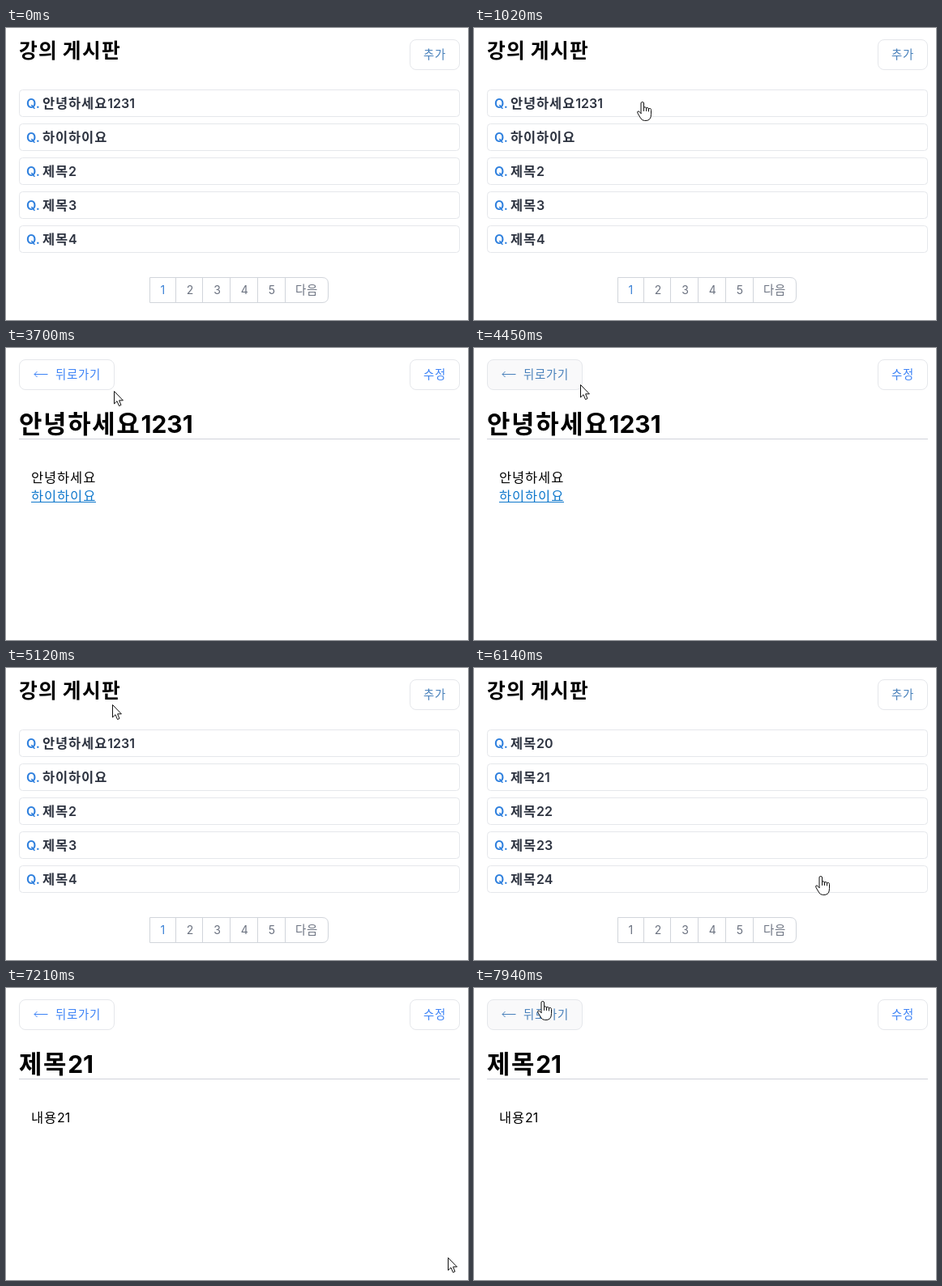
Write an HTML page that moves like this. It is 570 by 361 pixels and loops after 8000 ms.

```html
<!DOCTYPE html>
<html lang="ko">
<head>
<meta charset="utf-8">
<title>강의 게시판</title>
<style>
html, body { margin: 0; width: 100%; height: 100%; overflow: hidden; background: #fff; }
svg { display: block; width: 570px; height: 361px; background: #fff; }
text { font-family: Inter, sans-serif; }
.ko {
  font-family: "Noto Sans CJK KR", "Noto Sans CJK JP", sans-serif;
  font-size: 1.03em;
  letter-spacing: .054em;
}
.thin { font-weight: 350; }
#ibeam { mix-blend-mode: difference; }
</style>
</head>
<body>
<svg id="stage" viewBox="0 0 570 361">
  <g id="pages"></g>
  <g id="arrow">
    <path d="M.5 .5V16L4 12.7L6.5 18.6L9 17.5L6.6 11.8H11.4Z" fill="#fff" stroke="#111"/>
  </g>
  <g id="hand" fill="#fff" stroke="#111" stroke-linejoin="round" stroke-linecap="round">
    <path d="M-1 14.5V2Q-1 .5 .7 .5Q2.5 .5 2.5 2V7.5Q4 5.5 5.5 8Q7.5 6.2 8.5 9Q11.5 7.4 11.5 10.5V15.5Q11.5 23.5 5 23.5H3.5Q0 23.5-1.7 20L-4.8 14.8Q-6 12.6-4.7 11.9Q-3.3 11.4-1 14.5Z"/>
    <path d="M2.5 7.5V11.5M5.5 8V11.5M8.5 9V12" fill="none"/>
  </g>
  <g id="ibeam">
    <path d="M-1.5-7.5H3.5M1.5-7.5V8.5M-1.5 8.5H3.5" fill="none" stroke="#fff"/>
  </g>
</svg>
<script>
const LOOP = 8000, HEIGHT = 361;
const BORDER = '#e5e7eb', BLUE = '#3b82f6', MUTED = '#4880bb', LINK = '#0f78cc';
const ROW = { top: 76, pitch: 42, height: 34, count: 5 };
const $ = id => document.getElementById(id);

function add(parent, tag, attrs = {}) {
  const el = document.createElementNS('http://www.w3.org/2000/svg', tag);
  for (const k in attrs) el.setAttribute(k, attrs[k]);
  parent.appendChild(el);
  return el;
}

// Hangul runs get their own face, spacing and weight.
function label(parent, str, x, y, size, fill, weight = 400, anchor = 'start') {
  const el = add(parent, 'text', {
    x, y, fill, 'font-size': size, 'font-weight': weight, 'text-anchor': anchor
  });
  for (const run of str.match(/[가-힣]+|[^가-힣]+/g)) {
    const style = weight > 400 ? 'ko' : 'ko thin';
    add(el, 'tspan', /[가-힣]/.test(run) ? { class: style } : {}).textContent = run;
  }
  return el;
}

function box(parent, x, y, w, h, rx) {
  return add(parent, 'rect', {
    x: x + .5, y: y + .5, width: w - 1, height: h - 1, rx, fill: '#fff', stroke: BORDER
  });
}

function cornerButton(g, str, fill) {
  box(g, 498, 14, 62, 38, 7.5);
  label(g, str, 529, 38, 14, fill, 400, 'middle');
}

function pager(g, current) {
  let d = 'M177.5 308.5H390Q397.5 308.5 397.5 316V332Q397.5 339.5 390 339.5H177.5Z';
  for (let n = 1; n <= 5; n++) {
    d += `M${Math.floor(175.4 + 33.75 * n) + .5} 308V340`;
    const fill = n === current ? '#3b82d6' : '#6b7280';
    label(g, String(n), 159.8 + 33.6 * n, 329, 14, fill, 400, 'middle');
  }
  label(g, '다음', 371, 329, 14, '#6b7280', 400, 'middle');
  add(g, 'path', { d, fill: 'none', stroke: '#d1d5db' });
}

function listPage(titleOf, current) {
  const g = add($('pages'), 'g');
  label(g, '강의 게시판', 16, 37, 24, '#000', 700);
  cornerButton(g, '추가', MUTED);
  for (let i = 0; i < ROW.count; i++) {
    const y = ROW.top + i * ROW.pitch;
    box(g, 16, y, 544, ROW.height, 4);
    label(g, 'Q.', 25, y + 23, 16, '#2f80de', 600);
    label(g, titleOf(i), 45, y + 23, 16, '#2d3340', 600);
  }
  pager(g, current);
  return { g, list: true };
}

function postPage(title, titleEnd, body, link) {
  const g = add($('pages'), 'g');
  const back = box(g, 16, 14, 118, 38, 7.5);
  const icon = add(g, 'path', { d: 'M51.5 32.5H35M38.5 29L35 32.5L38.5 36', fill: 'none' });
  const text = label(g, '뒤로가기', 61, 38, 14, BLUE);
  cornerButton(g, '수정', BLUE);
  label(g, title, 16, 105, 30, '#000', 700);
  add(g, 'path', { d: 'M16 112.5H560', stroke: '#d1d3da' });
  label(g, body, 31, 166, 16, '#000');
  if (link) {
    label(g, link, 31, 189, 16, LINK);
    add(g, 'path', { d: 'M31 190.5H111', stroke: LINK });
  }
  const hover = on => {
    back.setAttribute('fill', on ? '#f9f9fa' : '#fff');
    icon.setAttribute('stroke', on ? MUTED : BLUE);
    text.setAttribute('fill', on ? MUTED : BLUE);
  };
  return { g, titleEnd, hover };
}

const first = listPage(i => ['안녕하세요1231', '하이하이요'][i] || '제목' + i, 1);
const last = listPage(i => '제목' + (20 + i));
const hello = postPage('안녕하세요1231', 233, '안녕하세요', '하이하이요');
const post21 = postPage('제목21', 108, '내용21');
const views = [first, last, hello, post21];

function pageAt(t) {
  if (t < 2270) return first;
  if (t < 5050) return hello;
  if (t < 5930) return first;
  return t < 6740 ? last : post21;
}

// Each glide starts where the previous one ended, optionally bending toward a point.
const glides = [];
let rest = [519, 365];
function glide(start, end, to, bend) {
  const from = rest;
  bend = bend || [(from[0] + to[0]) / 2, (from[1] + to[1]) / 2];
  glides.push({ start, end, from, bend, to });
  rest = to;
}

// Up to the first row, then open it.
glide(110, 890, [202, 90], [370, 330]);
glide(890, 1020, [207, 91]);
// Look around the post, then go back.
glide(2750, 3130, [370, 211]);
glide(3130, 3560, [216, 125]);
glide(3560, 3700, [133, 53]);
glide(3700, 3970, [125, 45], [100, 20]);
glide(4449, 4450, [131, 45]);
// Leave the stage, return to the second row.
glide(5260, 5600, [531, 375]);
glide(5929, 5930, [400, 352]);
glide(5930, 6670, [345, 146], [480, 260]);
// Off to the corner and up to the back button.
glide(6940, 7300, [558, 345]);
glide(7300, 7740, [142, 82]);
glide(7740, 7940, [84, 16]);

function pointer(t) {
  const { start, end, from, bend, to } = glides.filter(g => g.start <= t).pop() || glides[0];
  const p = Math.max(0, Math.min(1, (t - start) / (end - start)));
  const u = p * (2 - p), v = 1 - u;
  return [0, 1].map(k => Math.round(v * v * from[k] + 2 * u * v * bend[k] + u * u * to[k]));
}

const within = (x, y, l, t, r, b) => x >= l && x < r && y >= t && y < b;
const onBack = (x, y) => within(x, y, 16, 14, 134, 52);

function cursorKind(page, x, y) {
  if (within(x, y, 498, 14, 560, 52)) return 'hand';
  if (page.list) {
    const bottom = ROW.top + ROW.count * ROW.pitch;
    const onRow = within(x, y, 16, ROW.top, 560, bottom) &&
      (y - ROW.top) % ROW.pitch < ROW.height;
    return onRow || within(x, y, 177, 308, 398, 340) ? 'hand' : 'arrow';
  }
  // The back button keeps a thin inactive edge on its right.
  if (onBack(x, y)) return x < 130 ? 'hand' : 'arrow';
  return within(x, y, 16, 76, page.titleEnd, 112) ? 'ibeam' : 'arrow';
}

function draw(t) {
  const page = pageAt(t);
  for (const v of views) v.g.style.display = v === page ? '' : 'none';
  const [x, y] = pointer(t);
  const kind = cursorKind(page, x, y);
  for (const id of ['arrow', 'hand', 'ibeam']) {
    $(id).style.display = id === kind && y < HEIGHT ? '' : 'none';
  }
  $(kind).setAttribute('transform', `translate(${x} ${y})`);
  if (page.hover) page.hover(onBack(x, y));
}

const origin = performance.now();
function tick(now) {
  draw(Math.max(0, now - origin) % LOOP);
  requestAnimationFrame(tick);
}
draw(0);
requestAnimationFrame(tick);
</script>
</body>
</html>
```
